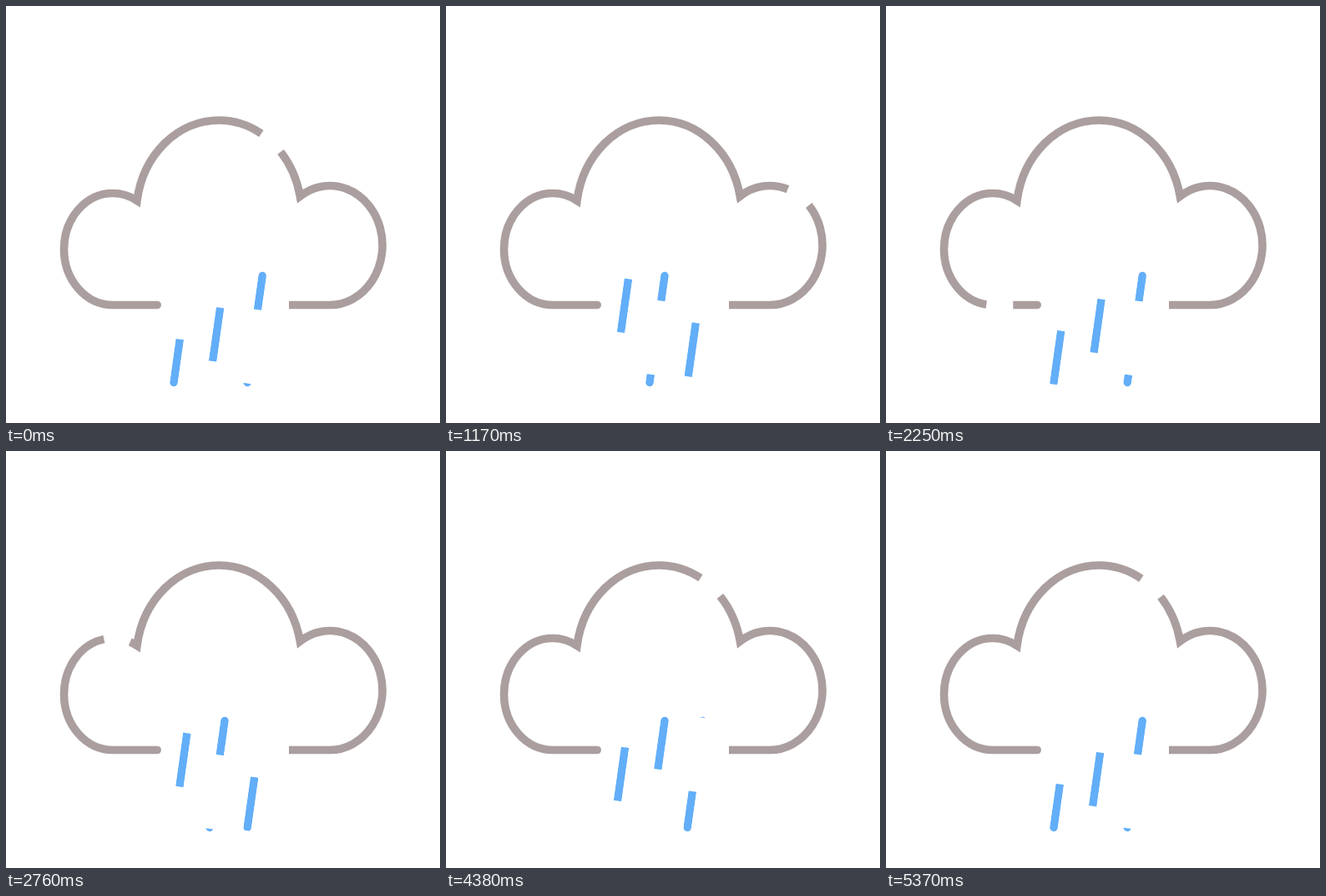
Recreate the animation shown at these times as an HTML page. Size 520 by 500 pixels, loop 5.4 s.

```html
<!DOCTYPE html>
<html lang="en">
<head>
<meta charset="utf-8">
<title>Rain cloud</title>
<style>
  html, body { margin: 0; width: 100%; height: 100%; overflow: hidden; background: #fff; }
  svg { display: block; width: 520px; height: 500px; }

  .cloud {
    fill: none;
    stroke: #ab9e9e;
    stroke-width: 9.6;
    stroke-dasharray: 999 32;
    animation: travel 5400ms infinite;
  }
  .drop {
    stroke: #62aef8;
    stroke-width: 10;
    stroke-dasharray: 64.8 89.2;
    animation: fall 5400ms linear infinite;
  }

  /* One gap runs once around the outline, then rests. */
  @keyframes travel {
    0% { stroke-dashoffset: 945px; animation-timing-function: cubic-bezier(.36, 0, .68, .35); }
    39.444% { stroke-dashoffset: 430px; animation-timing-function: cubic-bezier(.28, .67, .55, 1); }
    83.889%, 100% { stroke-dashoffset: -86px; }
  }
  /* Seven dash periods per loop. */
  @keyframes fall {
    0% { stroke-dashoffset: var(--start); }
    99.444%, 100% { stroke-dashoffset: calc(var(--start) - 1078px); }
  }
</style>
</head>
<body>
<svg viewBox="0 0 520 500">
  <defs>
    <clipPath id="pill">
      <rect x="-4.7" y="-4.7" width="9.4" height="138.6" rx="4.7"/>
    </clipPath>
  </defs>

  <path class="cloud" pathLength="1031" d="M255 137
    A99.15 113 0 0 1 352.3 228.1
    A63 71.5 0 1 1 388 358.5
    H128
    A58.5 67 0 0 1 128 224.5
    A58.5 67 0 0 1 157 233.4
    A99.15 113 0 0 1 255 137Z"/>
  <!-- Opening in the base, with a rounded end on its left -->
  <path fill="#fff" d="M339 345V372H181.2V363.3A4.8 4.8 0 0 0 181.2 353.7V345Z"/>

  <g transform="translate(219 323.5) rotate(8)" clip-path="url(#pill)">
    <line class="drop" style="--start: -86.7px" y1="-10" y2="144"/>
  </g>
  <g transform="translate(262 323.5) rotate(8)" clip-path="url(#pill)">
    <line class="drop" style="--start: -48.4px" y1="-10" y2="144"/>
  </g>
  <g transform="translate(307.2 323.5) rotate(8)" clip-path="url(#pill)">
    <line class="drop" style="--start: 14px" y1="-10" y2="144"/>
  </g>
</svg>
</body>
</html>
```
